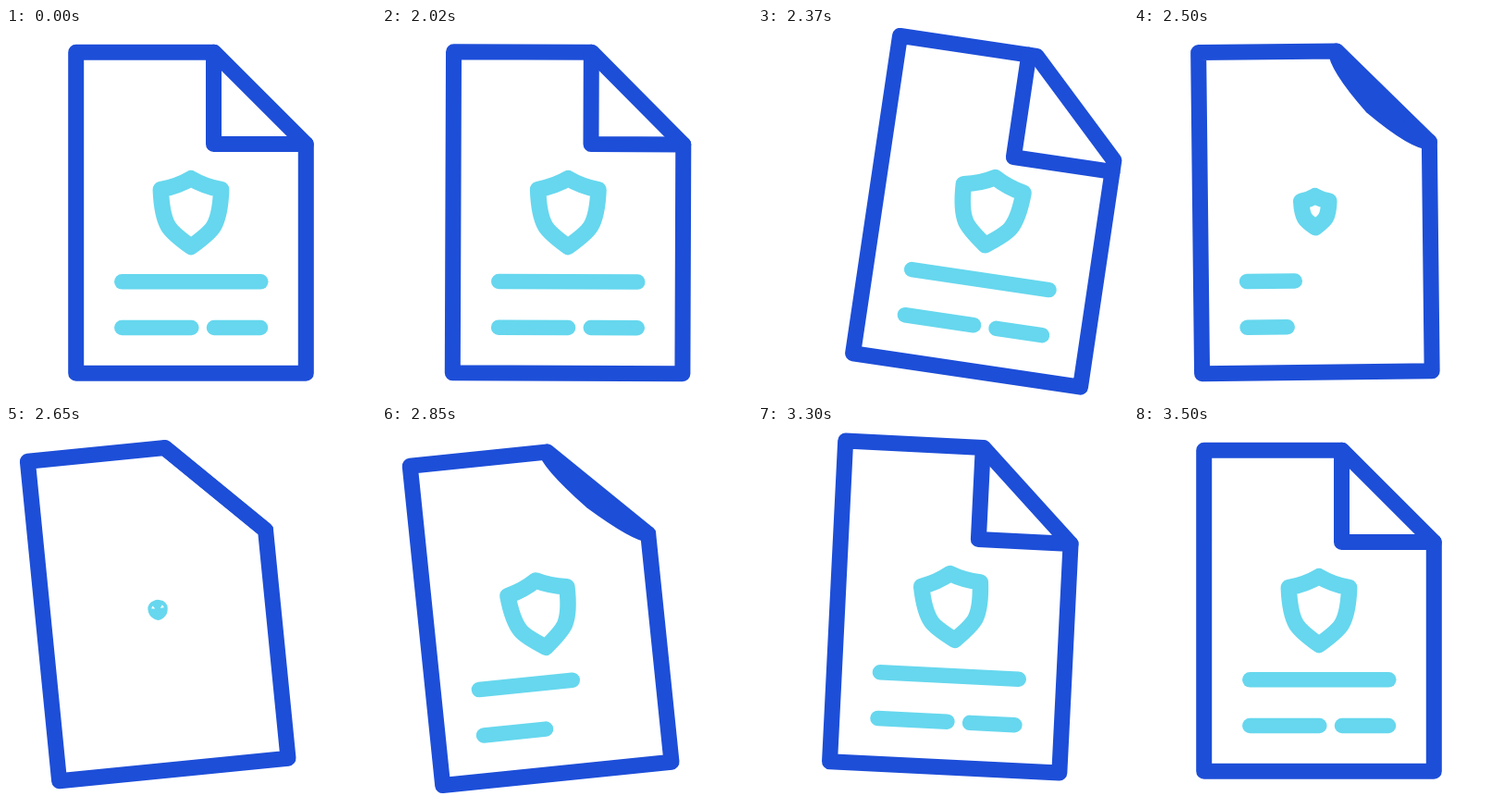
Write an HTML page with a canvas that moves like this. It is 400x400 px and loops after 3.52 s.

```html
<!DOCTYPE html>
<html>
<head>
<meta charset="utf-8">
<style>
html, body { margin: 0; width: 100%; height: 100%; overflow: hidden; background: #fff; }
canvas { display: block; }
</style>
</head>
<body>
<canvas id="stage" width="400" height="400"></canvas>
<script>
const ctx = document.getElementById('stage').getContext('2d');
const LOOP = 3520, BLUE = '#1d4ed8', CYAN = '#66d7ee';
const CENTER = [200, 199.75];

// Key poses of the swinging page: time in ms, angle in degrees, x, y.
const swing = [
  [1990, 0, 0, 0], [2340, 9.1, 55, -1.5], [2520, -1.6, -10, -1], [2650, -5.65, -35.75, -1],
  [2745, -6.3, -39, 4], [2850, -5.87, -28.5, 3.5], [3150, 4.7, 17, -7], [3500, 0, 0, 0]
];

const clamp = u => Math.min(1, Math.max(0, u));
const smooth = u => u * u * (3 - 2 * u);
const ease = (t, from, to) => smooth(clamp((t - from) / (to - from)));
const easeOut = (t, from, to) => 1 - (1 - clamp((t - from) / (to - from))) ** 3;
const bell = (t, from, top, to) => ease(t, from, top) - ease(t, top, to);
const mix = (a, b, k) => a.map((v, i) => v + (b[i] - v) * k);

// Monotone cubic interpolation through the key poses.
function pose(t) {
  const last = swing.length - 1;
  if (t <= swing[0][0] || t >= swing[last][0]) return [0, 0, 0];
  const i = swing.findIndex(key => key[0] > t) - 1;
  const h = swing[i + 1][0] - swing[i][0], u = (t - swing[i][0]) / h;
  return [1, 2, 3].map(col => {
    const slope = k => (swing[k + 1][col] - swing[k][col]) / (swing[k + 1][0] - swing[k][0]);
    const tangent = k => {
      if (k === 0 || k === last) return 0;
      const a = slope(k - 1), b = slope(k);
      return a * b > 0 ? 2 * a * b / (a + b) : 0;
    };
    return swing[i][col] + h * (slope(i) * smooth(u)
      + u * (1 - u) * ((1 - u) * tangent(i) - u * tangent(i + 1)));
  });
}

function place(x, y, angle, scale = 1) {
  ctx.translate(CENTER[0] + x, CENTER[1] + y);
  ctx.rotate(angle * Math.PI / 180);
  ctx.scale(scale, scale);
  ctx.translate(-CENTER[0], -CENTER[1]);
}

function stroke(path, color, width) {
  ctx.strokeStyle = color;
  ctx.lineWidth = width;
  ctx.stroke(path);
}

const outline = new Path2D('M75.7 26.2H225L324.3 125.5V373.3H75.7Z');
const badge = new Path2D(`M200 162.7Q186 171 167.3 174.7C168 194 170.5 206 175.5 214.5
  C180 222 191 230 200 236.5C209 230 220 222 224.5 214.5C229.5 206 232 194 232.7 174.7Q214 171 200 162.7Z`);

// The flap bulges out from the cut edge until its corner is square.
function drawFold(t) {
  const open = 1 - ease(t, 2370, 2560) + ease(t, 2720, 3240);
  const slide = bell(t, 2020, 2370, 2470);
  const dx = -8 * slide, dy = 12.5 * slide;
  const start = [224.5 + dx, 26.2], end = [324.3, 125.5 + dy];
  const corner = [start[0], end[1]];
  const tip = mix(mix(start, end, .5), corner, open);
  const fold = new Path2D();
  fold.moveTo(...start);
  fold.quadraticCurveTo(...mix(start, corner, .73 * open), ...tip);
  fold.quadraticCurveTo(...mix(end, corner, .73 * open), ...end);
  stroke(fold, BLUE, 17);
}

// The badge changes size while its line keeps its weight.
function drawBadge(t) {
  const tilt = bell(t, 2750, 3100, 3500);
  const size = 1 - .94 * bell(t, 2380, 2600, 2600) - .05 * tilt
    - .94 * (ease(t, 2600, 2600.1) - ease(t, 2660, 2820));
  ctx.save();
  place(0, 0, -14 * tilt, size);
  stroke(badge, CYAN, 17.5 / size);
  ctx.restore();
}

function drawBar(x, y, length) {
  if (length < 1) return;
  const bar = new Path2D();
  bar.moveTo(x, y);
  bar.lineTo(x + length, y);
  stroke(bar, CYAN, 16.5);
}

function drawBars(t) {
  const left = 1 - ease(t, 2380, 2580);
  const upper = 150 * (left + easeOut(t, 2660, 3270));
  const lower = 125 * (left + easeOut(t, 2660, 3500));
  drawBar(125.3, 274.3, upper);
  drawBar(125.3, 324, Math.min(75, lower));
  drawBar(225, 324, lower - 75);
}

function draw(t) {
  const [angle, x, y] = pose(t);
  ctx.clearRect(0, 0, 400, 400);
  ctx.save();
  ctx.lineCap = ctx.lineJoin = 'round';
  place(x, y, angle);
  stroke(outline, BLUE, 17);
  drawFold(t);
  drawBadge(t);
  drawBars(t);
  ctx.restore();
}

function frame() {
  draw(performance.now() % LOOP);
  requestAnimationFrame(frame);
}
frame();
</script>
</body>
</html>
```
